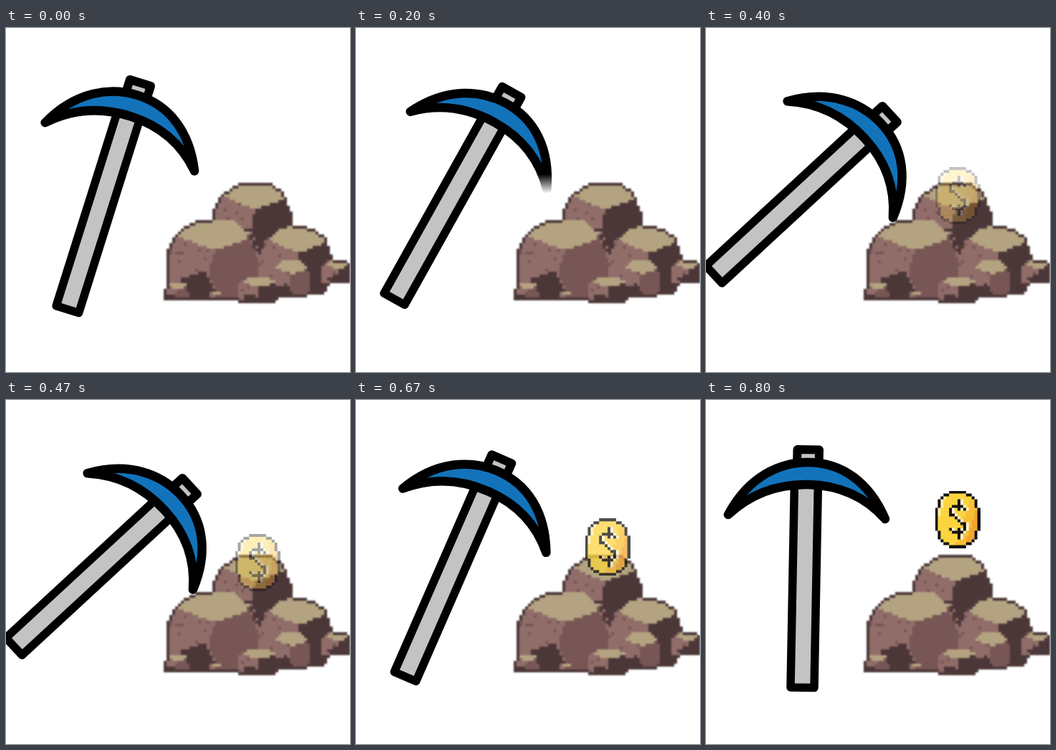
An HTML page with a canvas that plays this animation: 480 px wide and 480 px high, repeating every 940 ms.

```html
<!DOCTYPE html>
<html lang="en">
<head>
<meta charset="utf-8">
<title>Pickaxe and coin</title>
<style>
  html, body { margin: 0; width: 100%; height: 100%; overflow: hidden; background: #fff; }
  canvas { display: block; width: 480px; height: 480px; }
</style>
</head>
<body>
<canvas id="stage" width="480" height="480"></canvas>
<script>
const SIZE = 480, CELL = 4, LOOP = 940;
const HIT = 4, LIFT = 7, LAST = 12;
const ctx = document.getElementById('stage').getContext('2d');

function layer(w, h) {
  const canvas = document.createElement('canvas');
  canvas.width = w;
  canvas.height = h;
  return [canvas, canvas.getContext('2d')];
}

// Fills a grid of cells; colorAt returns null outside, and cells on the rim get the rim colour
function pixelate(g, cols, rows, colorAt, rim) {
  for (let y = 0; y < rows; y++) {
    for (let x = 0; x < cols; x++) {
      const color = colorAt(x, y);
      if (!color) continue;
      const inner = colorAt(x - 1, y) && colorAt(x + 1, y) && colorAt(x, y - 1) && colorAt(x, y + 1);
      g.fillStyle = inner ? color : rim;
      g.fillRect(x * CELL, y * CELL, CELL, CELL);
    }
  }
}

// One boulder in a unit box; every rock in the pile is a scaled copy
const BODY = new Path2D('M0 1V.4L.08 .22 .22 .08 .4 0 .72 .03 .88 .17 1 .55 .95 .85 .86 1Z');
const SIDE = new Path2D('M.52 .38L.88 .2 1 .55 .95 .85 .86 1H.57L.46 .68Z');
const FOOT = new Path2D('M.13 .74L.42 .64 .55 .96H.25Z');
const TOP = new Path2D('M.13 .21L.25 .07 .4 0 .72 .03 .88 .17 .87 .26 .52 .39 .3 .3Z');
const LIGHT = '#906d69', MID = '#775655', DARK = '#4c3738', TAN = '#b4a381';

// x, y, width, height, colour of the right face; back to front
const BOULDERS = [
  [290, 214, 112, 100, DARK],
  [354, 276, 104, 96, DARK],
  [224, 266, 130, 114, MID],
  [368, 323, 58, 52, MID],
  [440, 323, 46, 34, DARK],
  [323, 347, 59, 37, DARK],
  [221, 354, 34, 27, MID],
  [284, 367, 20, 13, MID]
];

function makeRocks() {
  const [pix, g] = layer(SIZE, SIZE);
  const [out, o] = layer(SIZE, SIZE);
  const hit = (path, u, v) => g.isPointInPath(path, u, v);
  const speck = (x, y) => Math.abs(Math.sin(x * 12.9 + y * 78.2) * 43758.5) % 1 < .07;

  pixelate(g, SIZE / CELL, SIZE / CELL, (cx, cy) => {
    let color = null;
    for (const [x, y, w, h, side] of BOULDERS) {
      const u = ((cx + .5) * CELL - x) / w, v = ((cy + .5) * CELL - y) / h;
      if (!hit(BODY, u, v)) continue;
      color = hit(TOP, u, v) ? TAN : hit(SIDE, u, v) ? side :
        hit(FOOT, u, v) ? DARK : speck(cx, cy) ? MID : LIGHT;
    }
    return color;
  }, '#4c3839');

  o.filter = 'blur(0.9px)';
  o.drawImage(pix, 0, 0);
  return out;
}

function makeCoin() {
  const [canvas, g] = layer(64, 80);
  const dollar = new Path2D('M10.5 6.5L9.5 5.5H6.5L5.5 6.5V8L10.5 12V13.5L9.5 14.5H6.5L5.5 13.5M8.5 3.5V6.5M8.5 13.5V16.5');
  const ink = (x, y) => g.isPointInStroke(dollar, x + .5, y + .5);

  pixelate(g, 16, 20, (x, y) => {
    if (Math.abs((x - 7.5) / 8) ** 2.4 + Math.abs((y - 9.5) / 10) ** 2.4 > 1) return null;
    if (ink(x, y)) return '#15120d';
    if (ink(x - 1, y)) return '#fff6cf';
    const shade = x * 1.5 + y * .5;
    return shade > 24 ? '#f2a52f' : shade > 19 ? '#f9bf35' : shade < 6 ? '#fff0a8' : '#fbd440';
  }, '#101010');
  return canvas;
}

const rocks = makeRocks(), coin = makeCoin();

const SHAFT = new Path2D('M123.5 112L118 401 151 401.5 156.5 112Z');
const CAP = new Path2D('M127 92L127.5 69 158 69.5 157.5 92Z');
const HEAD = new Path2D('M31 160C60 105 105 87 142 87C190 87 228 115 250 166C225 138 190 119 143 118C100 117 62 131 31 160Z');

function drawPick(angle) {
  ctx.save();
  ctx.translate(140, 228);
  ctx.rotate(angle * Math.PI / 180);
  ctx.translate(-140, -228);
  ctx.strokeStyle = '#000';
  ctx.lineJoin = 'round';
  for (const [path, fill, width] of [[SHAFT, '#c3c3c3', 11.5], [CAP, '#c3c3c3', 12], [HEAD, '#1273bb', 12.5]]) {
    ctx.fillStyle = fill;
    ctx.lineWidth = width;
    ctx.fill(path);
    ctx.stroke(path);
  }
  ctx.restore();
}

// The tip fades out just before the blow lands
function fadeTip() {
  const fade = ctx.createLinearGradient(0, 204, 0, 231);
  fade.addColorStop(0, 'rgba(255,255,255,0)');
  fade.addColorStop(1, '#fff');
  ctx.fillStyle = fade;
  ctx.fillRect(252, 204, 30, 34);
}

// Lean in, hold the blow, swing back, then snap upright
function pickAngle(step) {
  if (step === LAST) return 0;
  if (step < HIT) return 16.4 + 3.9 * step;
  return 46.2 - 7.9 * Math.max(0, step - LIFT);
}

function drawCoin(step) {
  const risen = Math.max(0, step - HIT);
  ctx.globalAlpha = risen / (LAST - HIT);
  ctx.drawImage(coin, 319.5, step === LAST ? 126.5 : 208.5 - 7.2 * risen, 63, 80);
  ctx.globalAlpha = 1;
}

// Fifteen steps a second, rounded to 10 ms; the last one is held
const startOf = step => 10 * Math.round(step * 20 / 3);

function draw(t) {
  let step = LAST;
  while (startOf(step) > t) step--;
  ctx.fillStyle = '#fff';
  ctx.fillRect(0, 0, SIZE, SIZE);
  drawPick(pickAngle(step));
  if (step === HIT - 1) fadeTip();
  ctx.drawImage(rocks, 0, 0);
  drawCoin(step);
}

const begin = performance.now();
function tick() {
  draw((performance.now() - begin) % LOOP);
  requestAnimationFrame(tick);
}
tick();
</script>
</body>
</html>
```
